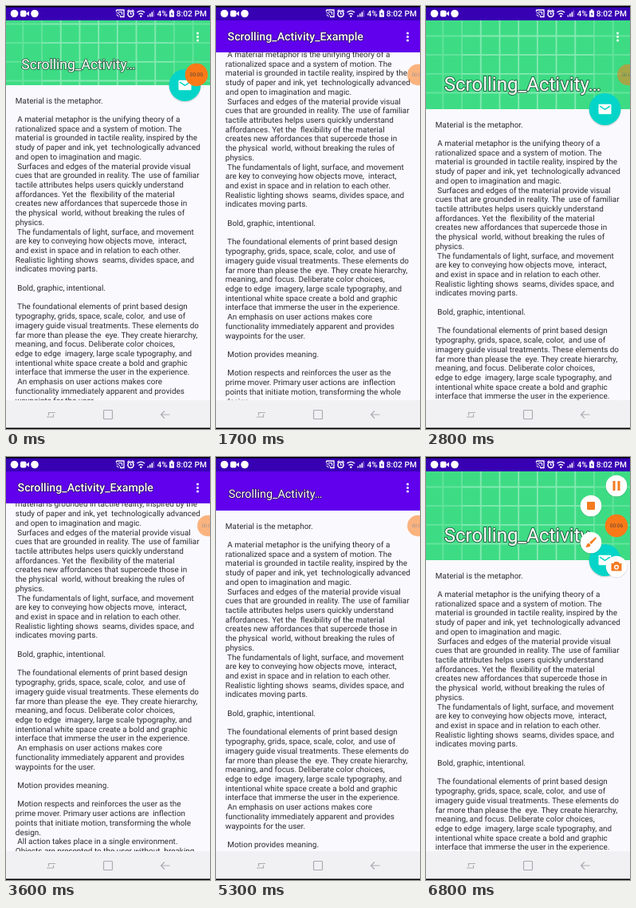
Write an HTML page that moves like this. It is 256x529 px and loops after 6.9 s.

```html
<!DOCTYPE html>
<html lang="en">
<head>
<meta charset="utf-8">
<title>Scrolling activity</title>
<style>
  html, body { margin: 0; width: 100%; height: 100%; overflow: hidden; background: #faf9fd; }
  svg { display: block; width: 256px; height: 529px; font-family: Roboto, sans-serif; }
  text { text-rendering: geometricPrecision; }
  #body text { font-size: 9.95px; fill: #2c2c2e; white-space: pre; }
  #title { fill: #fff; stroke: #111; stroke-opacity: .6; paint-order: stroke; stroke-linejoin: round; }
</style>
</head>
<body>
<svg viewBox="0 0 256 529">
  <defs>
    <clipPath id="headerClip"><rect id="headerBox" y="17" width="256"/></clipPath>
  </defs>
  <rect width="256" height="529" fill="#faf9fd"/>
  <g id="body"></g>

  <g clip-path="url(#headerClip)">
    <rect y="17" width="256" height="112" fill="#3ddc84"/>
    <path id="grid" fill="none" stroke="#fff" stroke-opacity=".2" stroke-width="1.9"/>
    <path id="innerGrid" fill="none" stroke="#fff" stroke-opacity=".2" stroke-width="1.9"/>
    <rect id="scrim" y="17" width="256" height="112" fill="#6000ec"/>
  </g>
  <text id="title"></text>
  <g fill="#fff">
    <circle cx="240.5" cy="34" r="1.5"/><circle cx="240.5" cy="38.5" r="1.5"/><circle cx="240.5" cy="43" r="1.5"/>
  </g>

  <g id="fab">
    <circle cy="1.2" r="20.3" fill="#000" opacity=".12"/>
    <circle r="19.9" fill="#05d5c8"/>
    <rect x="-8" y="-6.3" width="16" height="12.6" rx="1.4" fill="#fff"/>
    <path d="M-6.5 -3.8L0 .4L6.5 -3.8" fill="none" stroke="#05d5c8" stroke-width="1.5"/>
  </g>

  <!-- status bar -->
  <rect width="256" height="18" fill="#3700b3"/>
  <g fill="#fff">
    <circle cx="10.5" cy="9.5" r="4.8"/>
    <rect x="18" y="5.5" width="7.5" height="8" rx="2"/><path d="M25 9.5l4 -3v6z"/>
    <circle cx="36" cy="9.5" r="4.8"/>
    <path d="M138.5 5h9.5v8.5h-5M138.5 5v2" fill="none" stroke="#fff" stroke-width="1.3"/>
    <path d="M138.5 8.5a5 5 0 0 1 5 5M138.5 11a2.5 2.5 0 0 1 2.5 2.5M141 7.500h4.500v3.500" fill="none" stroke="#fff"/>
    <circle cx="156.5" cy="9.8" r="3.6" fill="none" stroke="#fff" stroke-width="1.5"/>
    <path d="M152.3 6.8l2.4 -2.200M160.7 6.8l-2.4 -2.200M156.5 7.600v2.400h1.800" fill="none" stroke="#fff" stroke-width="1.2"/>
    <path d="M164.500 8a7 7 0 0 1 9.500 0M166.500 10.500a4 4 0 0 1 5.500 0" fill="none" stroke="#fff" stroke-width="1.3"/>
    <circle cx="169.300" cy="12.700" r="1.300"/>
    <path d="M177.500 11.500h1.500v2h-1.500zM180 9.500h1.500v4h-1.500zM182.500 7.500h1.500v6h-1.500z"/>
    <path d="M184.500 5.500h1.300v8h-1.300z" opacity=".45"/>
    <path d="M205 5.800h1.700v-1.500h2.600v1.500h1.700v8h-6z"/>
    <path d="M208.400 7.300l-1.800 3h1.400l-.4 2.400l1.900 -3.200h-1.400z" fill="#3700b3"/>
    <g font-size="10.2" font-weight="500">
      <text x="189.5" y="13.2">4%</text>
      <text x="213.8" y="13.2">8:02 PM</text>
    </g>
  </g>

  <!-- navigation bar -->
  <rect y="493" width="256" height="36" fill="#f1f0f3"/>
  <g fill="none" stroke="#acacb0" stroke-width="1.2">
    <path d="M53.5 512V508.5H62M59.5 510.5V514H51"/>
    <rect x="122.5" y="505.5" width="11" height="11" rx="1"/>
    <path d="M205.5 511H194.5M199 506.5L194.5 511L199 515.5"/>
  </g>

  <!-- recorder overlay -->
  <g id="menu" fill="#f47b20">
    <g><path d="M-4.5 -6h3v12h-3zM1.5 -6h3v12h-3z"/></g>
    <g><rect x="-5" y="-5" width="10" height="10" rx="1"/></g>
    <g><path d="M6 -7L7 -5.5L.5 2L-2 0zM-2.7 .8L-.5 3C-1 6 -4 6 -7 5.5C-5 4.5 -5.5 1 -2.7 .8"/></g>
    <g>
      <path d="M-6.5 -4h3l1 -2h5l1 2h3v9.5h-13z"/>
      <circle cy=".8" r="3" fill="#fff"/><circle cy=".8" r="1.6"/>
    </g>
  </g>
  <g id="bubble">
    <circle r="14.3" fill="#fb7a18"/>
    <text id="clock" y="2.4" text-anchor="middle" font-size="6.6" fill="#55423c"></text>
  </g>

  <!-- letterbox edges -->
  <path d="M0 0H256V1.4H0zM0 527.6H256V529H0z"/>
</svg>

<script>
const LOOP = 6900, STEP = 100;
const EXPANDED = 129, COLLAPSED = 58, RANGE = EXPANDED - COLLAPSED;
const LINE = 11.72, FIRST_BASELINE = 151.5;

const copy = `Material is the metaphor.

 A material metaphor is the unifying theory of a
rationalized space and a system of motion. The
material is grounded in tactile reality, inspired by the
study of paper and ink, yet  technologically advanced
and open to imagination and magic.
 Surfaces and edges of the material provide visual
cues that are grounded in reality. The  use of familiar
tactile attributes helps users quickly understand
affordances. Yet the  flexibility of the material
creates new affordances that supercede those in
the physical  world, without breaking the rules of
physics.
 The fundamentals of light, surface, and movement
are key to conveying how objects move,  interact,
and exist in space and in relation to each other.
Realistic lighting shows  seams, divides space, and
indicates moving parts.

 Bold, graphic, intentional.

 The foundational elements of print based design
typography, grids, space, scale, color,  and use of
imagery guide visual treatments. These elements do
far more than please the  eye. They create hierarchy,
meaning, and focus. Deliberate color choices,
edge to edge  imagery, large scale typography, and
intentional white space create a bold and graphic
interface that immerse the user in the experience.
 An emphasis on user actions makes core
functionality immediately apparent and provides
waypoints for the user.

 Motion provides meaning.

 Motion respects and reinforces the user as the
prime mover. Primary user actions are  inflection
points that initiate motion, transforming the whole
design.
 All action takes place in a single environment.
Objects are presented to the user without  breaking
the continuity of experience even as they transform
and reorganize.
 Motion is meaningful and appropriate, serving to
focus attention and  maintain continuity. Feedback is
subtle yet clear. Transitions are efficient yet
coherent.

 3D world.

 The material environment is a 3D space, which
means all objects have x, y, and z  dimensions.`;

// [time, value] keys
const scrollKeys = [[0, 30], [100, 45], [300, 76], [500, 92], [800, 101], [1200, 122], [1500, 117],
  [1700, 111], [1900, 88], [2100, 50], [2200, 28], [2400, 0], [2800, 0], [2900, 14], [3000, 36],
  [3300, 94], [3600, 136], [4000, 182], [4300, 198], [4600, 176], [5000, 103], [5300, 62],
  [5600, 24], [5800, 0], [LOOP, 0]];
const scrimKeys = [[0, 0], [600, 1], [2200, 1], [2700, 0], [2950, 0], [3500, 1], [5600, 1], [6200, 0]];
const fabKeys = [[0, 1], [200, 0], [2200, 0], [2400, 1], [2950, 1], [3150, 0], [5600, 0], [5800, 1]];
const dockKeys = [[0, 0], [1000, 0], [1300, 1], [6300, 1], [6500, 0]];
const menuKeys = [[0, 0], [6400, 0], [6800, 1]];
const menuSpots = [[239, 36], [207, 61], [207, 107], [239, 137]];

const $ = id => document.getElementById(id);
const mix = (a, b, k) => a + (b - a) * k;
const place = (el, x, y, scale = 1) => el.setAttribute("transform", `translate(${x} ${y}) scale(${scale})`);

function sample(keys, t) {
  const next = keys.findIndex(key => key[0] > t);
  if (next < 0) return keys[keys.length - 1][1];
  const [t0, a] = keys[next - 1], [t1, b] = keys[next];
  return mix(a, b, (t - t0) / (t1 - t0));
}

function svg(tag, attrs, parent) {
  const el = document.createElementNS("http://www.w3.org/2000/svg", tag);
  for (const name in attrs) el.setAttribute(name, attrs[name]);
  return parent.appendChild(el);
}

function gridPath(from, to, start, end) {
  const unit = 256 / 108;
  const px = v => (v * unit).toFixed(2);
  let d = "";
  for (let v = from; v <= to; v += 10)
    d += `M${px(v)} ${px(start)}V${px(end)}M${px(start)} ${px(v)}H${px(end)}`;
  return d;
}

copy.split("\n").forEach((line, i) => {
  svg("text", { x: 11.8, y: FIRST_BASELINE + i * LINE }, $("body")).textContent = line;
});
$("grid").setAttribute("d", gridPath(9, 99, 0, 108));
$("innerGrid").setAttribute("d", gridPath(29, 79, 19, 89));
const buttons = [...$("menu").children];
for (const button of buttons) {
  button.prepend(svg("circle", { r: 13.3, fill: "#fff" }, button));
  button.prepend(svg("circle", { r: 13.8, cy: .6, fill: "#000", opacity: .12 }, button));
}

function drawTitle(collapse) {
  const title = $("title"), closed = collapse >= 1;
  const shrink = 1 - (1 - collapse) ** 2;
  title.textContent = closed ? "Scrolling_Activity_Example" : "Scrolling_Activity…";
  title.setAttribute("x", mix(22.8, 14.6, collapse));
  title.setAttribute("y", mix(106, 43, collapse));
  title.setAttribute("font-size", mix(24, 14.2, shrink));
  title.setAttribute("font-weight", closed ? 500 : 400);
  title.setAttribute("stroke-width", mix(1.9, 1.5, collapse));
}

function draw(t) {
  const scroll = sample(scrollKeys, t);
  const lift = Math.min(scroll, RANGE);
  const bottom = EXPANDED - lift;

  place($("body"), 0, -scroll);
  $("headerBox").setAttribute("height", bottom - 17);
  for (const id of ["grid", "innerGrid"]) place($(id), 0, -55 - lift / 2);
  $("scrim").setAttribute("opacity", sample(scrimKeys, t));
  drawTitle(lift / RANGE);
  place($("fab"), 224.5, bottom, sample(fabKeys, t));

  const dock = sample(dockKeys, t);
  place($("bubble"), mix(239, 253.2, dock), 86, mix(1, .92, dock));
  $("bubble").setAttribute("opacity", mix(1, .55, dock));
  $("clock").textContent = "00:0" + Math.floor(t / 1000);

  const open = sample(menuKeys, t);
  $("menu").setAttribute("visibility", open ? "visible" : "hidden");
  buttons.forEach((button, i) => {
    const [x, y] = menuSpots[i];
    place(button, mix(239, x, open), mix(86, y, open), open);
  });
}

const begin = performance.now();
function tick() {
  const t = (performance.now() - begin) % LOOP;
  draw(Math.floor(t / STEP) * STEP);
  requestAnimationFrame(tick);
}
tick();
</script>
</body>
</html>
```
